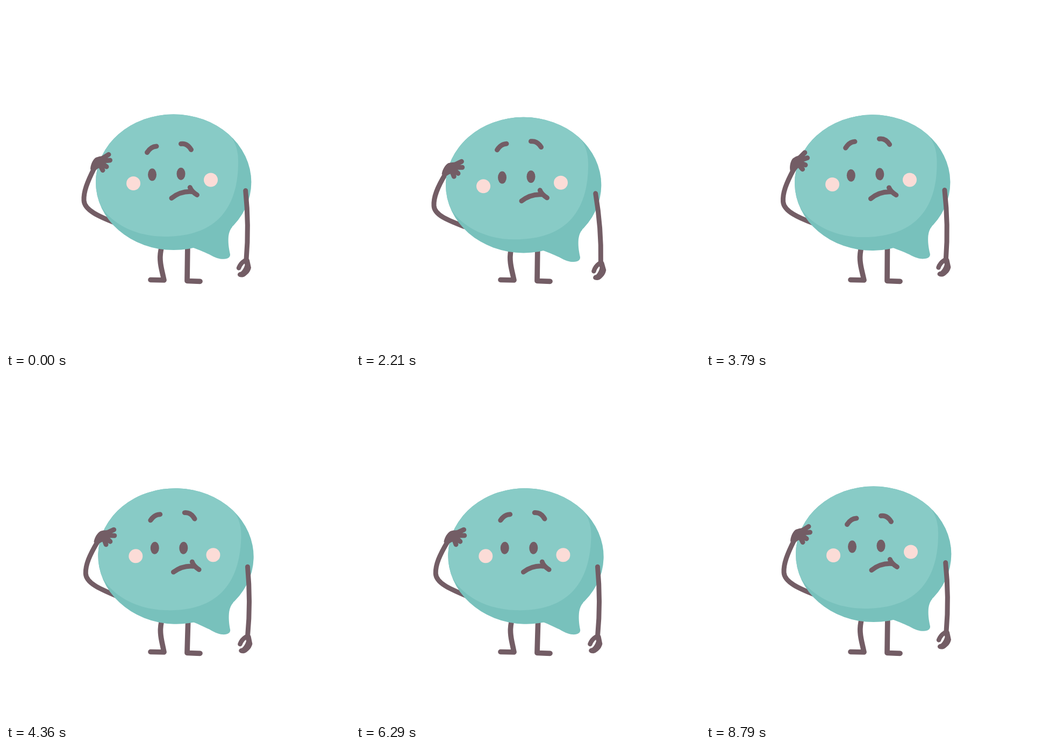
These frames come from a looping animation (640 px wide and 640 px high, 9070 ms). An HTML page:

```html
<!DOCTYPE html>
<html lang="en">
<head>
<meta charset="utf-8">
<title>Puzzled speech bubble</title>
<style>
  html, body { margin: 0; width: 100%; height: 100%; overflow: hidden; background: #fff; }
  svg { display: block; width: 100%; height: 100%; }
  .line { fill: none; stroke: #735d65; stroke-width: 9; stroke-linecap: round; stroke-linejoin: round; }
  .dark { fill: #735d65; }
  .shade { fill: #78c1bc; }
  .light { fill: #88cbc6; }
  .cheek { fill: #fbdcd7; }
</style>
</head>
<body>
<svg viewBox="0 0 640 640">
  <defs>
    <clipPath id="bubble"><ellipse cx="311.7" cy="327.8" rx="144.7" ry="126.3"/></clipPath>
  </defs>

  <g id="legs" class="line" style="stroke-width:9.7">
    <path d="M292 440C285 461 286 474 289.500 490L294 510L269 509.500"/>
    <path d="M338 440L337 511.500L361 512.300"/>
  </g>

  <g id="body">
    <path id="armL" class="line"/>
    <ellipse class="shade" cx="311.7" cy="327.8" rx="144.7" ry="126.3"/>
    <path class="shade" d="M340 447C356 452 367 457 378 462C390 469 398 471 405 470.800Q417.500 470 417 462C414 449 413 438 414 428Q415.500 417 421 411L400 380Z"/>
    <path class="light" clip-path="url(#bubble)"
      d="M172 362C187 400 237 429.500 296 429C372 429 432 395 432 290C432 268 427 252 412 234L400 150H100V362Z"/>

    <g id="brows" class="line">
      <path d="M262.500 272.500Q269.500 261.500 280 261"/>
      <path d="M325.500 256.500Q337 255 344.500 267.300"/>
    </g>
    <ellipse class="dark eye" cx="272" cy="313.800" rx="8" ry="11.500"/>
    <ellipse class="dark eye" cx="325.500" cy="312.200" rx="8" ry="11.500"/>
    <circle class="cheek" cx="237" cy="330" r="13"/>
    <circle class="cheek" cx="381" cy="323.500" r="13"/>
    <path class="line" d="M308 357.500Q325 344 346 345.500M342.300 337.500Q345 345 355.500 351.500"/>

    <g id="handL">
      <path class="dark" d="M157 304C157 295 162 285 167 282Q174 279 182 279L184 294C178 297 174 301 170 303L164 308Z"/>
      <path class="line" d="M174 287L191 276.300M174 289L193.500 287M174 290L187 299M172 290L180 305.500"/>
    </g>

    <g id="armR">
      <path class="line" d="M445.700 343.500C450 385 451 425 447 472"/>
      <path class="line" style="stroke-width:8.500" d="M444 474Q436 479 433 487.500"/>
      <path class="dark" d="M442 471L447 468Q452 469 453 473L456 487Q454 495 449 499Q444 504 440 504.500Q432 505 430.800 500Q431 495.500 437 494.500Q442 490 444.500 482Z"/>
    </g>
  </g>
</svg>

<script>
const LOOP = 9070;
const STEP = LOOP / 127;
const $ = id => document.getElementById(id);

// slide and reach move the scratching hand, hand turns it, swing turns the hanging arm.
const rest  = { bob: 0,   tilt: 0,     hand: 0,   slide: 0,   reach: 0,    swing: 0 };
const sunk  = { bob: 5.8, tilt: 0,     hand: 7,   slide: 3,   reach: 5,    swing: 0 };
const left  = { bob: 0,   tilt: -1.65, hand: -18, slide: 1.5, reach: -2.5, swing: -0.8 };
const right = { bob: 3.5, tilt: 1.75,  hand: 5.7, slide: 1.5, reach: 3,    swing: 1.2 };
const poses = [[0, rest], [2700, sunk], [3500, left], [4370, right],
               [5200, left], [6320, right], [8250, rest], [LOOP, rest]];

// Smooth rise from 0 to 1 between two times.
function ramp(t, from, to) {
  const u = Math.min(1, Math.max(0, (t - from) / (to - from)));
  return u * u * (3 - 2 * u);
}

function poseAt(t) {
  const i = poses.findIndex(([time]) => time > t);
  const [[t0, a], [t1, b]] = poses.slice(i - 1, i + 1);
  const k = ramp(t, t0, t1);
  return Object.fromEntries(Object.keys(a).map(key => [key, a[key] + (b[key] - a[key]) * k]));
}

const place = (id, transform) => $(id).setAttribute('transform', transform);

function draw(t) {
  const { bob, tilt, hand, slide, reach, swing } = poseAt(t);
  const raise = ramp(t, 0, 1750) - ramp(t, 6500, 8200);
  const away = ramp(t, 0, 1600) - ramp(t, 2790, 3500);
  const blink = ramp(t, 8290, 8530) - ramp(t, 8530, 8790);

  place('legs', `translate(0 510) skewX(${-tilt / 2}) translate(0 -510)`);
  place('body', `translate(0 ${bob}) rotate(${tilt} 309 470)`);
  place('brows', `translate(0 ${-10 * raise})`);
  place('handL', `translate(${slide} ${reach}) rotate(${hand} 164 302)`);
  place('armR', `rotate(${-swing - 3.75 * away} 445.7 343.5)`);
  $('armL').setAttribute('d', `M${164 + slide} ${302 + reach}
    C151 ${328 + reach} 144 ${346 + reach} 145 ${362 + reach}
    C146 ${380 + reach} 174 ${392 + reach / 2} 202 ${403 + reach / 2}`);
  for (const eye of document.querySelectorAll('.eye'))
    eye.setAttribute('ry', 11.5 * (1 - 0.9 * blink));
}

const start = performance.now();
function tick() {
  const t = (performance.now() - start) % LOOP;
  draw(Math.min(Math.floor(t / STEP + 0.1), 126) * STEP);
  requestAnimationFrame(tick);
}
tick();
</script>
</body>
</html>
```
